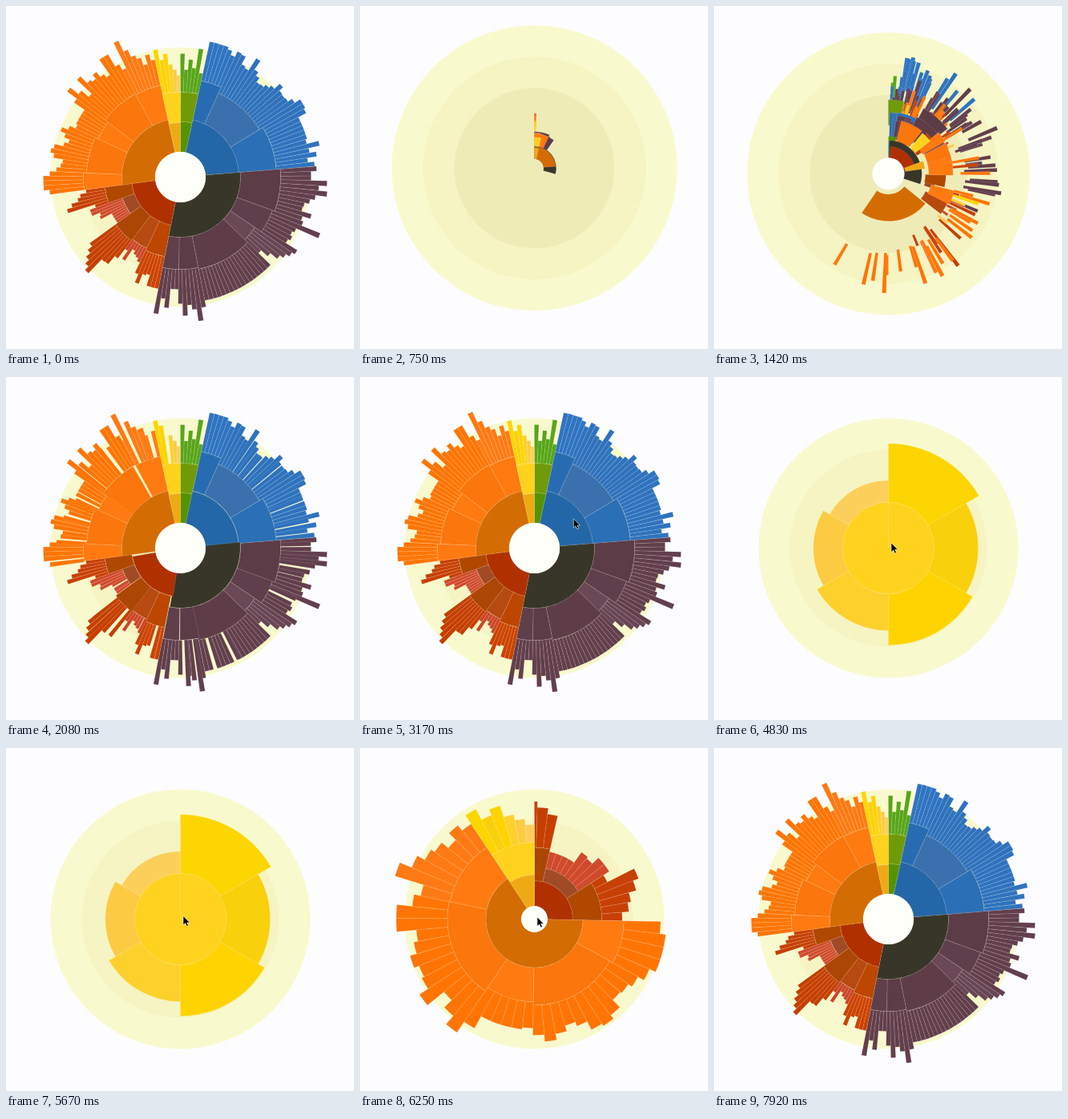
Recreate the animation shown at these times as an HTML page. Size 434x428 px, loop 8.01 s.

```html
<!DOCTYPE html>
<html lang="en">
<head>
<meta charset="utf-8">
<title>Zoomable sunburst</title>
<style>
html, body { margin: 0; width: 100%; height: 100%; overflow: hidden; background: #fdfdff; }
svg { display: block; width: 434px; height: 428px; }
.arc { stroke: #fff; stroke-opacity: .22; stroke-width: .5; }
</style>
</head>
<body>
<svg viewBox="0 0 434 428">
  <g id="chart">
    <g id="rings"></g>
    <g id="arcs"></g>
    <circle id="hub" fill="#fffffa"/>
  </g>
  <path id="pointer" d="M0 0V11.5L2.7 9L4.5 13L6.4 12.2L4.7 8.3H8.2Z" fill="#000" stroke="#fff" stroke-width=".6"/>
</svg>
<script>
const LOOP = 8010, STEP = 83.4, HUB = 31.5, CX = 217.5, CY = 213.5;

// branches: [leaf count, outer radius, branch colour, leaf colour]
// leaves: outer radius, or [repeat, radius]
const groups = [
  { color: '#559300', r: 69, late: .5,
    branches: [[6, 106, '#6f9b08', '#58a51a']],
    leaves: [154, 134, 147, 137, 162, 132] },
  { color: '#2467a8', r: 73, late: 1,
    branches: [[6, 123, '#276cb2', '#2f74c2'], [17, 115, '#3a70ad', '#2f72bd'], [13, 120, '#2b6fb6', '#2f73bf']],
    leaves: [[4, 173], 170, 165, 172, 171, 160, 158, 176, 163, 158, 152, 153, 157, 161, 170, 164, 163, 164,
      170, 178, 178, 176, [5, 165], 163, 178, 164, 172, 160, 168] },
  { color: '#383629', r: 75, late: 1,
    branches: [[12, 125, '#5c3c47', '#623f4c'], [7, 122, '#5f3f4b', '#623f4c'], [5, 112, '#6a4856', '#684654'],
      [17, 117, '#5e3d48', '#623f4c'], [6, 115, '#5c3c47', '#623f4c'], [5, 115, '#5f3f4b', '#623f4c']],
    leaves: [170, 163, 163, 183, 173, 184, 170, 164, 158, 157, 170, 160, 163, 188, 158, 155, 158, 155, 172,
      168, 163, 158, 147, 136, [17, 157], 165, 181, 166, 160, 173, 158, 140, 140, 164, 153, 173] },
  { color: '#b03000', r: 61, late: 1,
    branches: [[7, 101, '#bd4600', '#cc4200'], [6, 98, '#b64a10', '#cb4628'], [8, 100, '#ac4604', '#c53f00'],
      [8, 77, '#a04a26', '#d04a2c'], [6, 95, '#b04800', '#c74006']],
    leaves: [[3, 142], 128, 130, 143, 132, 118, 114, 112, 108, 125, 113, 128, 141, 142, 166, 160, 154, 147,
      140, [4, 97], 112, 110, 120, 120, 112, 147, 140, 131, 127, 119] },
  { color: '#d46c04', r: 73, late: .15,
    branches: [[5, 121, '#ff7a10', '#ff7505'], [11, 117, '#fb760c', '#ff7505'], [6, 113, '#ff7a10', '#ff7505'],
      [12, 118, '#fb760c', '#ff7505'], [8, 117, '#ff7a10', '#ff7a14']],
    leaves: [164, [3, 171], 163, 155, 150, 148, 160, 165, 162, 151, 146, 153, 160, 152, 144, [4, 146], 162,
      177, 164, 152, 177, 165, 162, 168, 160, 155, 178, 178, 160, 152, 187, 172, 162, 157, 147, 158, 150] },
  { color: '#eeaa14', r: 68, late: .5,
    branches: [[6, 106, '#ffd21e', '#ffd400']],
    leaves: [162, 148, 155, 141, 134, 127],
    tints: ['#fdd500', '#f9d00c', '#ffd300', '#fdd02c', '#fccb42', '#fccf5a'] }
];

const $ = id => document.getElementById(id);
const clamp = (v, a = 0, b = 1) => Math.min(b, Math.max(a, v));
const mix = (a, b, t) => a + (b - a) * t;
const cubic = u => u < .5 ? 4 * u ** 3 : 1 - 4 * (1 - u) ** 3;
const ease = (t, start, span) => cubic(clamp((t - start) / span));

function add(parent, tag, attrs) {
  const el = document.createElementNS('http://www.w3.org/2000/svg', tag);
  for (const k in attrs) el.setAttribute(k, attrs[k]);
  return parent.appendChild(el);
}

let seed = 29;
function rand() {
  seed = (seed * 16807) % 2147483647;
  return seed / 2147483647;
}

const expand = list => list.flatMap(v => Array.isArray(v) ? Array(v[0]).fill(v[1]) : v);
const tiers = [[], [], []];
let total = 0;
for (const g of groups) {
  const first = total;
  const radii = expand(g.leaves);
  let i = 0;
  for (const [count, r, fill, leafFill] of g.branches) {
    tiers[1].push({ at: total, size: count, r0: g.r, r1: r, fill, late: rand() });
    for (let n = 0; n < count; n++, i++) {
      const tint = g.tints ? g.tints[i] : leafFill;
      tiers[0].push({ at: total++, size: 1, r0: r, r1: radii[i], fill: tint, late: rand() ** 1.2 });
    }
  }
  tiers[2].push({ at: first, size: total - first, r0: HUB, r1: g.r, fill: g.color, late: g.late });
}
const unit = 360 / total;
const nodes = tiers.flat();
for (const n of nodes) n.el = add($('arcs'), 'path', { class: 'arc', fill: n.fill });
const rings = ['#f9f9ce', '#f5f4c2', '#efebb7'].map(fill => add($('rings'), 'circle', { fill }));

function sector(a0, a1, r0, r1) {
  if (a1 - a0 < .02 || r1 < .1) return '';
  a1 = Math.min(a1, a0 + 359.98);
  r0 = Math.max(0, r0);
  const pt = (a, r) => {
    const q = a * Math.PI / 180;
    return (r * Math.sin(q)).toFixed(2) + ' ' + (-r * Math.cos(q)).toFixed(2);
  };
  const big = a1 - a0 > 180 ? 1 : 0;
  return `M${pt(a0, r0)}L${pt(a0, r1)}A${r1} ${r1} 0 ${big} 1 ${pt(a1, r1)}L${pt(a1, r0)}` +
    (r0 ? `A${r0} ${r0} 0 ${big} 0 ${pt(a0, r0)}` : '') + 'Z';
}

// pointer stops: time, x, y
const stops = [[2750, 425, 290], [3450, 209, 136], [4250, 209, 136], [4750, 221, 207], [5500, 221, 207], [5800, 221, 211]];

function placePointer(t) {
  const shown = t >= stops[0][0] && t < 7000;
  $('pointer').setAttribute('visibility', shown ? 'visible' : 'hidden');
  if (!shown) return;
  let k = 0;
  while (k < stops.length - 2 && t > stops[k + 1][0]) k++;
  const [t0, x0, y0] = stops[k], [t1, x1, y1] = stops[k + 1];
  const e = ease(t, t0, t1 - t0);
  $('pointer').setAttribute('transform', `translate(${mix(x0, x1, e)} ${mix(y0, y1, e)})`);
}

function draw(step) {
  const t = step * 1000 / 12;
  const intro = step >= 5 && t < 2300;
  const e = intro ? ease(t, 420, 1810) : 1;
  const grow = intro ? clamp((t - 400) / 500) : 1;

  // zoom into the last group and back out
  const turn = ease(t, 3700, 1000) - ease(t, 5810, 1000);
  const push = ease(t, 3700, 1000) - ease(t, 5810, 735);
  const fan = 1 / (1 - (1 - 6 / total) * turn);
  const stretch = 1 / (1 - .2366 * push);
  const angle = a => clamp(360 - fan * (360 - a), 0, 360);
  const radius = r => Math.max(0, 264 - (264 - r) * stretch);

  $('chart').setAttribute('transform', `translate(${CX} ${mix(202, CY, e)})`);
  $('chart').setAttribute('opacity', step < 5 ? clamp(1 - step / 3) : 1);
  const disc = mix(178, 162, e ** 5);
  rings.forEach((c, i) => c.setAttribute('r', disc - i * 39));
  $('hub').setAttribute('r', intro ? HUB * e : radius(HUB));

  for (const n of nodes) {
    const a = n.at * unit, w = n.size * unit;
    let d;
    if (intro) {
      const p = ease(t, 865 + 365 * n.late, 1000);
      const s = (.52 + .48 * p ** .7) * grow;
      d = sector(a * p, a * p + w, n.r0 * s, n.r1 * s);
    } else {
      d = sector(angle(a), angle(a + w), radius(n.r0), radius(n.r1));
    }
    n.el.setAttribute('d', d);
  }
  placePointer(t);
}

let last = -1;
const begin = performance.now();
function tick() {
  const t = (performance.now() - begin) % LOOP;
  const step = Math.min(95, Math.floor((t + 8) / STEP));
  if (step !== last) draw(last = step);
  requestAnimationFrame(tick);
}
tick();
</script>
</body>
</html>
```
